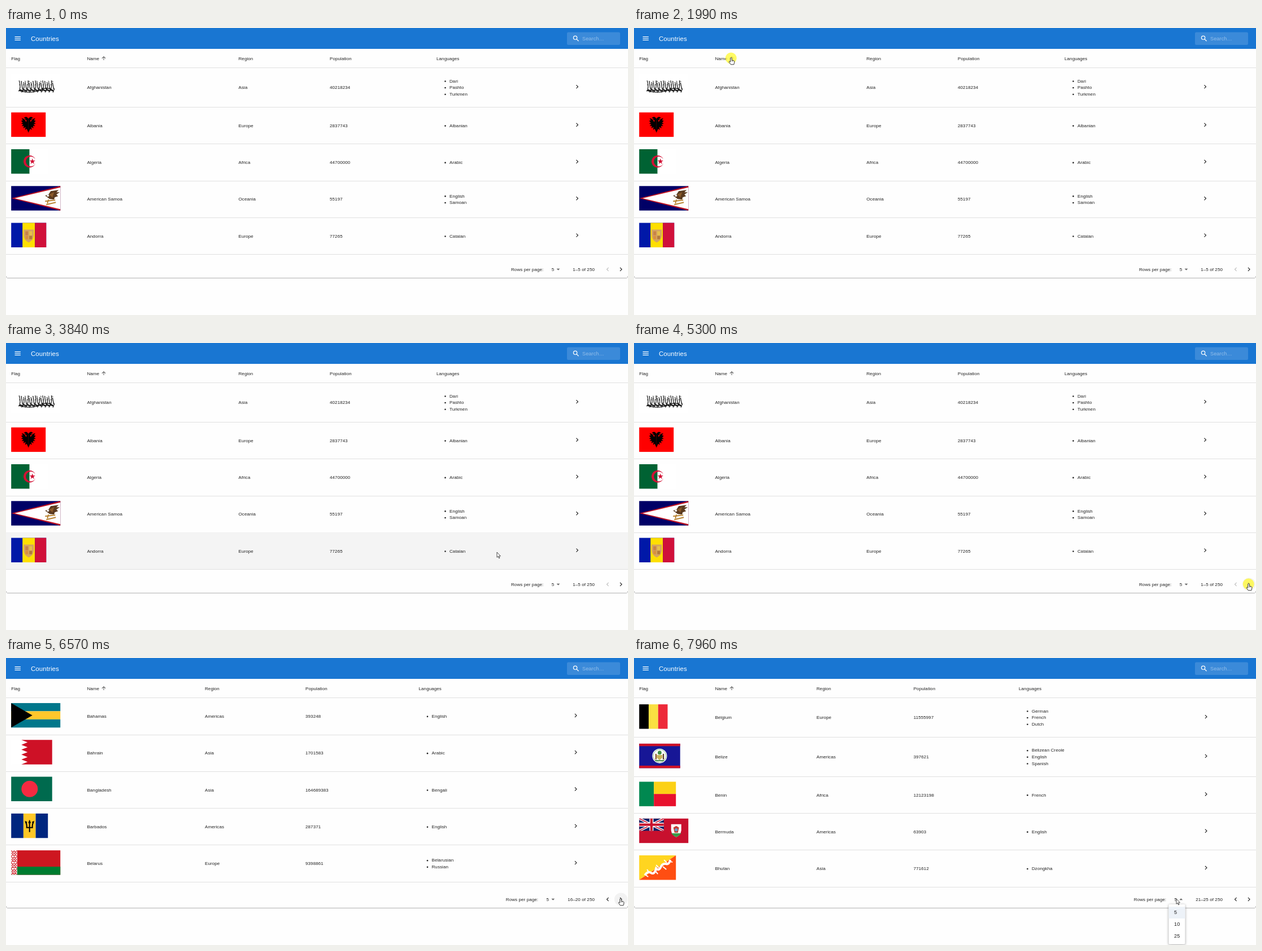
These frames come from a looping animation (1101 px wide and 509 px high, 8000 ms). An HTML page:

```html
<!DOCTYPE html>
<html lang="en">
<head>
<meta charset="utf-8">
<title>Countries</title>
<style>
html, body { margin: 0; width: 100%; height: 100%; overflow: hidden; background: #fefefe; }
svg { display: block; width: 1101px; height: 509px; font: 8.03px "Liberation Sans", Arial, sans-serif; letter-spacing: .0107em; }
</style>
</head>
<body>
<svg id="stage" viewBox="0 0 1101 509"></svg>
<script>
const LOOP = 8000, H = 43.4, INK = '#212121', HEAD_BOTTOM = 70.5, BODY_BOTTOM = 409;
const FLAG_DELAY = 110, MENU_OPENS = 7860;

// Shape helpers
const rect = (x, y, w, h, fill, extra = '') => `<rect x="${x}" y="${y}" width="${w}" height="${h}" fill="${fill}" ${extra}/>`;
const path = (d, fill, extra = '') => `<path d="${d}" fill="${fill}" ${extra}/>`;
const line = (d, color, width) => path(d, 'none', `stroke="${color}" stroke-width="${width}"`);
const disc = (x, y, r, fill, extra = '') => `<circle cx="${x}" cy="${y}" r="${r}" fill="${fill}" ${extra}/>`;
const at = (x, y, body, more = '') => `<g transform="translate(${x} ${y}) ${more}">${body}</g>`;
const text = (s, x, y, extra = `fill="${INK}"`) => `<text x="${x}" y="${y + 2.9}" ${extra}>${s}</text>`;
const range = n => [...Array(n).keys()];
const star = (x, y, r, fill, points = 5, inner = .4) => path('M' + range(points * 2).map(i => {
  const a = i * Math.PI / points - Math.PI / 2, k = i % 2 ? r * inner : r;
  return `${(x + k * Math.cos(a)).toFixed(2)} ${(y + k * Math.sin(a)).toFixed(2)}`;
}).join('L') + 'Z', fill);
const rows = (w, ...colors) => colors.map((c, i) => rect(0, i * H / colors.length, w, H / colors.length, c)).join('');
const columns = (w, ...colors) => colors.map((c, i) => rect(i * w / colors.length, 0, w / colors.length, H, c)).join('');

const unionJack = () => `<svg width="43.5" height="21.7">${rect(0, 0, 44, 22, '#012169')
  }${line('M0 0L43.5 21.7M0 21.7L43.5 0', '#fff', 4.3)}${line('M0 0L43.5 21.7M0 21.7L43.5 0', '#c8102e', 1.5)
  }${line('M21.7 0V22M0 10.8H44', '#fff', 7)}${line('M21.7 0V22M0 10.8H44', '#c8102e', 4.2)}</svg>`;
const shield = 'M-9 -10H9V1Q8 9 0 13Q-8 9 -9 1Z';
const crescent = 'M43 18.8A10.8 10.8 0 1 0 43 24.6A8.7 8.7 0 1 1 43 18.8Z';
const eagleHalf = 'M0 11L3 8 6 8 8 10 5 11 6 13 3 14 4 17 7 12 12 10 10 14 13 15 10 18 13 20 9 21 12 24 8 24 9 28 5 26 6 31 3 29 0 36Z';

const flags = {
  Afghanistan: () => rect(0, 0, 87, H, '#fff')
    + range(9).map(i => at(14 + i * 6.9, 11, line(`M${i % 3} ${i % 2 * 3}Q3 9 1 16Q4 21 7 16Q7 13 5 12M4 ${2 + i % 3}L6 15M-1 19Q3 13 6 20`, '#111', 1.2)
      + line('M0 8l2 -1M3 1l2 1M4 21l2 -1', '#111', 1))).join('') + line('M14 29Q35 35 50 28T74 29', '#111', 1.2),
  Albania: () => rect(0, 0, 61, H, '#f00') + at(30.5, 0, path(eagleHalf, '#000') + at(0, 0, path(eagleHalf, '#000'), 'scale(-1 1)')),
  Algeria: () => columns(65, '#006233', '#fff') + path(crescent, '#d21034') + star(37.5, 21.7, 5.4, '#d21034'),
  'American Samoa': () => rect(0, 0, 87, H, '#006') + path('M0 21.7L87 0V43.4Z', '#bd1021') + path('M6 21.7L87 2.4V41Z', '#fff')
    + path('M60 17L66 15 70 9 84 7 80 11 86 11 80 15 83 18 77 20 76 24 68 23Z', '#5b3b20') + path('M67 15L76 11 73 20Z', '#8b5a2b')
    + line('M60 27L78 25M62 33L79 29M66 24l-2 7', '#b98534', 2) + disc(65, 17, 2, '#eee'),
  Andorra: () => rect(0, 0, 62, H, '#0018a8') + rect(20, 0, 22, H, '#fedf00') + rect(42, 0, 20, H, '#d0103a')
    + at(31, 22, path(shield, '#d5a45f') + rect(-6, -7, 5, 7, '#c98247') + rect(1, -7, 5, 7, '#e6c04a') + rect(-6, 1, 5, 6, '#d98f3e') + rect(1, 1, 5, 6, '#b3793b')),
  Angola: () => rows(65, '#cc092f', '#000') + line('M32 9Q44 12 42 23Q39 33 29 31', '#ffcb00', 2.8) + line('M25 24L43 33', '#ffcb00', 2.3) + star(31.5, 17, 4, '#ffcb00'),
  Anguilla: () => rect(0, 0, 87, H, '#012169') + unionJack() + at(66, 20, path(shield, '#fff') + path('M-8 5H8Q5 10 0 12Q-5 10 -8 5Z', '#77c7da')
    + `<circle r="5" cy="-2" fill="none" stroke="#f7941d" stroke-width="3" stroke-dasharray="8 2.5"/>`),
  Antarctica: () => rect(0, 0, 65, H, '#3a7dce')
    + path('M12 9L17 13 20 7 29 5 38 6 43 11 48 15 49 20 52 23 50 30 45 34 39 36 34 40 30 38 31 34 25 33 20 31 14 28 16 24 11 21 16 17 11 12Z', '#fff'),
  Antigua: () => rect(0, 0, 65, H, '#ce1126') + path('M0 0H65L32.5 43.4Z', '#fff') + path('M0 0H65L52 17.4H13Z', '#000')
    + star(32.5, 17.4, 14, '#fcd116', 16, .62) + path('M13 17.4H52L45.5 26H19.5Z', '#0072c6'),
  Argentina: () => rows(69.5, '#74acdf', '#fff', '#74acdf') + star(34.7, 21.7, 6.2, '#f6b40e', 16, .7) + disc(34.7, 21.7, 3.4, '#f6a00e', 'stroke="#85340a" stroke-width=".6"'),
  Armenia: () => rows(87, '#d90012', '#0033a0', '#f2a800'),
  Aruba: () => rect(0, 0, 65, H, '#418fde') + rect(0, 29, 65, 2.4, '#fbe122') + rect(0, 33.8, 65, 2.4, '#fbe122') + star(11, 11, 8, '#fff', 4) + star(11, 11, 7, '#d22630', 4),
  Australia: () => rect(0, 0, 87, H, '#012169') + unionJack() + star(21.7, 32.5, 6.5, '#fff', 7, .45)
    + [[65, 7], [55, 19], [74, 16], [65, 36]].map(p => star(...p, 3.2, '#fff', 7, .45)).join(''),
  Austria: () => rows(65, '#c8102e', '#fff', '#c8102e'),
  Azerbaijan: () => rows(87, '#00b5e2', '#ef3340', '#509e2f') + at(25, 11, path(crescent, '#fff'), 'scale(.5)') + star(47, 21.7, 3.6, '#fff', 8, .5),
  Bahamas: () => rows(87, '#00778b', '#ffc72c', '#00778b') + path('M0 0L37.5 21.7 0 43.4Z', '#000'),
  Bahrain: () => rect(0, 0, 72.5, H, '#fff') + path('M72.5 0H18' + range(5).map(i => `L29 ${i * 8.68 + 4.34}L18 ${(i + 1) * 8.68}`).join('') + 'H72.5Z', '#ce1126'),
  Bangladesh: () => rect(0, 0, 72.5, H, '#006a4e') + disc(32.6, 21.7, 14.5, '#f42a41'),
  Barbados: () => columns(65, '#00267f', '#ffc726', '#00267f') + line('M32.5 13V33M25.5 15Q28 19 27.5 25H37.5Q37 19 39.5 15', '#000', 2)
    + path('M32.5 11L35 17H30ZM24 13L28.5 15 26 18ZM41 13L36.5 15 39 18Z', '#000'),
  Belarus: () => rect(0, 0, 87, H, '#ce1720') + rect(0, 29, 87, 14.4, '#007c30') + rect(0, 0, 10.5, H, '#fff')
    + range(4).map(i => at(5.2, 5.4 + i * 10.85, line('M0 -4.5L4 0 0 4.5 -4 0ZM-5 -5L-2 -2M5 -5L2 -2M-5 5L-2 2M5 5L2 2', '#ce1720', 1.1) + star(0, 0, 2.3, '#ce1720', 4))).join(''),
  Belgium: () => columns(50.3, '#000', '#fae042', '#ed2939'),
  Belize: () => rect(0, 0, 72.5, H, '#171696') + rect(0, 0, 72.5, 4.4, '#ce1127') + rect(0, 39, 72.5, 4.4, '#ce1127') + disc(36.2, 21.7, 13, '#fff')
    + disc(36.2, 21.7, 11.3, 'none', 'stroke="#4a8c4a" stroke-width="1" stroke-dasharray="1.6 .8"') + path('M31 20H41V25L36 29 31 25Z', '#c9b45b')
    + disc(36.2, 16, 3.4, '#3f8f46') + rect(28.5, 18, 2.3, 10, '#8a5a35') + rect(41.7, 18, 2.3, 10, '#5d412d') + line('M28 30H44', '#4a8c4a', 2),
  Benin: () => rect(0, 0, 26, H, '#008850') + rect(26, 0, 39, 21.7, '#fcd116') + rect(26, 21.7, 39, 21.7, '#e8112d'),
  Bermuda: () => rect(0, 0, 87, H, '#c8102e') + unionJack() + at(65.5, 20, path(shield, '#fff') + path('M-9 6H9Q6 10 0 13Q-6 10 -9 6Z', '#3b9a4b')
    + path('M-5 -4L0 -7 5 -4 3 5H-3Z', '#c63d36') + disc(0, 0, 2.7, '#6d9bc8')),
  Bhutan: () => path('M0 0H65L0 43.4Z', '#ffd520') + path('M65 0V43.4H0Z', '#ff4e12')
    + line('M10 35Q15 27 21 31T30 23Q35 28 38 21T47 15Q53 17 55 8', '#fff', 4) + line('M17 30l-3 -5M28 27l5 6M35 22l-5 -5M42 20l6 5M49 13l-5 -5M53 10l6 2M10 34l6 4', '#fff', 1.9),
  Zimbabwe: () => rows(87, '#006400', '#ffd200', '#d40000', '#000', '#d40000', '#ffd200', '#006400')
    + path('M0 0L37 21.7 0 43.4Z', '#fff', 'stroke="#000" stroke-width="1"') + star(13, 21.7, 8, '#d40000') + path('M11 26L12 17 15 19 14 26Z', '#ffd200'),
  Zambia: () => rect(0, 0, 65, H, '#198a00') + at(43, 17, columns(21, '#de2010', '#000', '#ef7d00')) + path('M44 8L54 6 64 8 57 12 54 10 51 12Z', '#ef7d00'),
  Yemen: () => rows(65, '#ce1126', '#fff', '#000')
};

// Columns: region, population, languages, chevron. Rows: name|region|population|languages[|flag]
const makePage = (label, shift, cols, ...lines) => ({ label, shift, cols, rows: lines.map(l => {
  const [name, region, population, langs, flag = name] = l.split('|');
  return { name, region, population, langs: langs ? langs.split(',') : [], flag };
}) });
const first = makePage('1–5', 0, [411.5, 573, 762, 1011],
  'Afghanistan|Asia|40218234|Dari,Pashto,Turkmen', 'Albania|Europe|2837743|Albanian', 'Algeria|Africa|44700000|Arabic',
  'American Samoa|Oceania|55197|English,Samoan', 'Andorra|Europe|77265|Catalan');
const descending = makePage('1–5', 0, [368, 496, 645, 1023],
  'Zimbabwe|Africa|14862927|Chibarwe,English,Kalanga,Khoisan,Ndau,Northern Ndebele,Chewa,Shona,Sotho,Tonga,Tswana,Tsonga,Venda,Xhosa,Zimbabwean Sign Language',
  'Zambia|Africa|18383956|English', 'Yemen|Asia|29825968|Arabic');
const second = makePage('6–10', 4.4, [437, 593, 764, 1022],
  'Angola|Africa|32866268|Portuguese', 'Anguilla|Americas|13452|English', 'Antarctica|Antarctic|1000|',
  'Antigua and Barbuda|Americas|97928|English|Antigua', 'Argentina|Americas|45376763|Guaraní,Spanish');
const third = makePage('11–15', 8.6, [310.3, 464, 631, 1023.5],
  'Armenia|Asia|2963234|Armenian', 'Aruba|Americas|106766|Dutch,Papiamento', 'Australia|Oceania|25687041|English',
  'Austria|Europe|8917205|Austro-Bavarian German', 'Azerbaijan|Asia|10110116|Azerbaijani,Russian');
const fourth = makePage('16–20', 9.2, [352, 530, 730.5, 1008.5],
  'Bahamas|Americas|393248|English', 'Bahrain|Asia|1701583|Arabic', 'Bangladesh|Asia|164689383|Bengali',
  'Barbados|Americas|287371|English', 'Belarus|Europe|9398861|Belarusian,Russian');
const fifth = makePage('21–25', 9.2, [323, 494.7, 681, 1012.5],
  'Belgium|Europe|11555997|German,French,Dutch', 'Belize|Americas|397621|Belizean Creole,English,Spanish', 'Benin|Africa|12123198|French',
  'Bermuda|Americas|63903|English', 'Bhutan|Asia|771612|Dzongkha');

const schedule = [[0, first], [2050, descending], [3370, first], [5360, second], [5710, third], [6290, fourth], [6780, fifth]];
const clicks = [[1920, 2050], [3240, 3370], [5230, 5360], [5570, 5710], [6150, 6290], [6640, 6780], [7760, 7890]];
const track = [[320, 600, 488], [1120, 215, 82], [1190, 205, 78], [1650, 172, 53], [3430, 172, 53], [3840, 869, 371],
  [4040, 890, 374], [4100, 892, 374], [4850, 1088, 427], [6900, 1088, 427], [7300, 962, 428], [7430, 960, 427]];

const clamp = v => Math.max(0, Math.min(1, v));
const pageAt = t => (schedule.findLast(([start]) => start <= t) || schedule[0])[1];
function cursorAt(t) {
  const i = track.findLastIndex(([start]) => start <= t), [t0, x0, y0] = track[i], [t1, x1, y1] = track[i + 1] || [LOOP, x0, y0];
  const k = clamp((t - t0) / (t1 - t0)), e = k * k * (3 - 2 * k);
  return { x: x0 + (x1 - x0) * e, y: y0 + (y1 - y0) * e };
}

const icon = (d, x, y, fill = INK, more = 'scale(.573)') => at(x, y, path(d, fill, 'transform="translate(-12 -12)"'), more);
const chevron = 'M8.59 16.59 13.17 12 8.59 7.41 10 6l6 6-6 6z';
const upArrow = 'M4 12l1.41 1.41L11 7.83V20h2V7.83l5.58 5.59L20 12l-8-8-8 8z';
const divider = y => rect(0, Math.round(y - .3), 1101, 1, '#e0e0e0');

const appBar = rect(0, 0, 1101, 37, '#1976d2') + icon('M3 18h18v-2H3zm0-5h18v-2H3zm0-7v2h18V6z', 20.7, 18.5, '#fff')
  + text('Countries', 44, 19.6, 'fill="#fff" font-size="11.47"') + rect(993, 7.5, 94, 22.5, '#fff', 'rx="2.3" fill-opacity=".15"')
  + at(1007.6, 17.3, disc(0, 0, 3.2, 'none', 'stroke="#fff" stroke-width="1.2"') + line('M2.3 2.3L6 6', '#fff', 1.3))
  + text('Search…', 1020, 19, 'fill="#fff" fill-opacity=".45" font-size="9.17"');
const paperEdge = line('M.3 440Q.3 443.3 2.5 443.3H1098.5Q1100.7 443.3 1100.7 440', '#bbb', 1) + rect(2, 444, 1097, 1, '#eee');

function header(cols, flip) {
  const titles = ['Region', 'Population', 'Languages'].map((s, i) => text(s, cols[i], 53.8)).join('');
  return text('Flag', 9.2, 53.8) + text('Name', 143.4, 53.8) + titles
    + icon(upArrow, 173, 53.6, '#444', `rotate(${180 * flip}) scale(.43)`) + divider(HEAD_BOTTOM);
}

function body(page, flagPage, pointer) {
  let y = HEAD_BOTTOM, out = '';
  page.rows.forEach((row, i) => {
    const h = Math.max(65.3, 34.95 + 11.6 * row.langs.length), mid = y + h / 2, [region, population, langs, arrow] = page.cols;
    if (pointer && pointer.y > y && pointer.y < Math.min(y + h, BODY_BOTTOM)) out += rect(0, y, 1101, h, '#f4f4f4');
    const flag = flags[(flagPage.rows[i] || row).flag];
    if (flag) out += at(9.2, mid - 23.2, flag());
    out += text(row.name, 143.4, mid) + text(row.region, region, mid) + text(row.population, population, mid);
    row.langs.forEach((lang, n) => {
      const ly = mid + (n - (row.langs.length - 1) / 2) * 11.6;
      out += disc(langs + 15.5, ly + .7, 1.3, INK) + text(lang, langs + 23, ly);
    });
    out += icon(chevron, arrow, mid - 1.2) + divider(y + h);
    y += h;
  });
  return `<svg width="1101" height="${BODY_BOTTOM}">${out}</svg>`;
}

const scrollbar = rect(1091, 37, 10, 372, '#f1f1f1') + rect(1092, 47, 8, 258, '#c1c1c1')
  + path('M1093.5 44h5l-2.5-3z', '#777') + path('M1093.5 402h5l-2.5 3z', '#777');

function footer(page, overNext, open) {
  const s = page.shift, start = page.label === '1–5';
  return (overNext ? disc(1088.5, 428, 11.6, '#f2f2f2') : '')
    + text('Rows per page:', 894 - s, 428) + text('5', 965.7 - s, 428)
    + icon('M7 10l5 5 5-5z', 977.5 - s, 428, '#666', `scale(.573 ${open ? -.573 : .573})`)
    + text(page.label + ' of 250', 1042, 428, `fill="${INK}" text-anchor="end"`)
    + icon(chevron, 1065, 428, start ? '#bdbdbd' : INK, 'scale(-.573 .573)') + icon(chevron, 1088.5, 428);
}

function menu(k) {
  const items = ['5', '10', '25'].map((s, i) => text(s, 956, 451.4 + i * 20.8, `fill="${INK}" font-size="9.17"`)).join('');
  const panel = rect(946.5, 436.8, 29, 71, '#fff', 'rx="2.3" style="filter:drop-shadow(0 1.5px 2px #0006)"');
  return `<g opacity="${k}" transform="translate(961 436.8) scale(${.75 + .25 * k} ${.56 + .44 * k}) translate(-961 -436.8)">${
    panel}${rect(946.5, 441.3, 29, 20.7, '#edf2f8')}${items}</g>`;
}

const hand = path('M-1.3 .3Q0 -1.2 1.2 .3V4L4.6 4.8Q6 5.3 5.8 7.5L4.8 11.8H-.6L-3.8 7.4Q-3.8 5.8 -2.5 6.3L-1.3 7.3Z', '#fff', 'stroke="#222" stroke-width=".9"')
  + line('M1.2 4V6.5M3 4.7V6.7', '#222', .6);
const arrow = path('M0 0V9.2L2.1 7.4 3.6 10.8 5 10.2 3.5 6.9H6.4Z', '#fff', 'stroke="#222" stroke-width=".8"');

function scene(t) {
  const page = pageAt(t), sorted = page === descending, open = t >= MENU_OPENS;
  const pointer = t >= track[0][0] ? cursorAt(t) : null;
  const overNext = pointer && Math.hypot(pointer.x - 1088.5, pointer.y - 428) < 11.6;
  const overSelect = pointer && !open && pointer.y > 417 && pointer.x > 952 && pointer.x < 978;
  const overName = pointer && pointer.y < 62 && pointer.x < 178;
  const flip = t < 3370 ? clamp((t - 2050) / 200) : 1 - clamp((t - 3370) / 200);
  let out = appBar + body(page, pageAt(t - FLAG_DELAY), pointer) + header(page.cols, flip)
    + (sorted ? scrollbar : '') + footer(page, overNext, open) + paperEdge;
  if (open) out += menu(clamp((t - MENU_OPENS) / 90));
  if (pointer) {
    if (clicks.some(([a, b]) => t >= a && t < b)) out += disc(pointer.x - .3, pointer.y + .5, 10, '#fff838', 'opacity=".78"');
    out += at(pointer.x, pointer.y, overNext || overSelect || overName ? hand : arrow);
  }
  return out;
}

const stage = document.getElementById('stage');
const started = performance.now();
let shown = '';
function frame() {
  const next = scene((performance.now() - started) % LOOP);
  if (next !== shown) stage.innerHTML = shown = next;
  requestAnimationFrame(frame);
}
frame();
</script>
</body>
</html>
```
